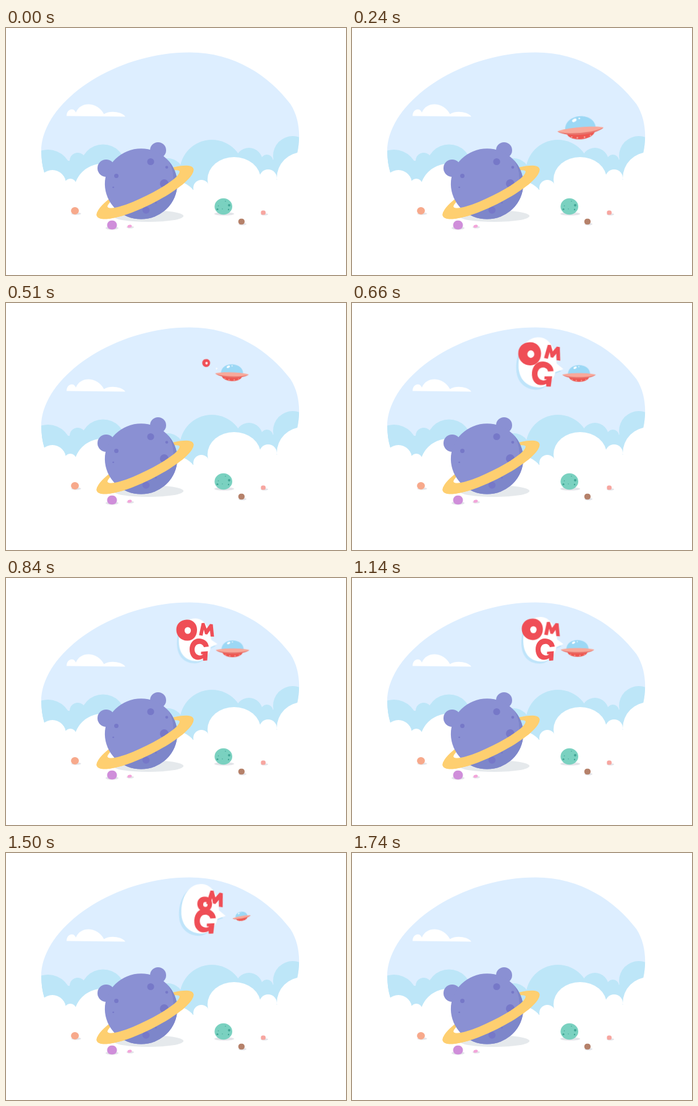
An HTML page that plays this animation: 550 px wide and 400 px high, repeating every 1950 ms.

```html
<!DOCTYPE html>
<html lang="en">
<head>
<meta charset="utf-8">
<title>Planet and saucer</title>
<style>
html, body { margin: 0; width: 100%; height: 100%; overflow: hidden; background: #fff; }
svg { display: block; width: 550px; height: 400px; }
.ufo, .say, .bubble, .o, .m, .g { animation: 1950ms linear infinite; transform-origin: 0 0; }
.ufo { animation-name: ufo; }
.say { animation-name: say; }
.bubble { animation-name: bubble; }
.o { animation-name: o; }
.m { animation-name: m; }
.g { animation-name: g; }

@keyframes ufo {
  0%, 3.08% { transform: translate(528px, 86px) rotate(-20deg) scale(0); }
  4.62% { transform: translate(511px, 96px) rotate(-20deg) scale(.4); }
  7.69% { transform: translate(456px, 138px) rotate(-17deg) scale(.95); }
  10.77% { transform: translate(392px, 163px) rotate(-10deg) scale(1.34); }
  12.31% { transform: translate(370px, 165.5px) rotate(-5deg) scale(1.38); }
  15.38% { transform: translate(352px, 151px) rotate(2deg) scale(1.3); }
  20% { transform: translate(352px, 123px) rotate(6deg) scale(1.1); }
  23.08% { transform: translate(359px, 116px) rotate(4deg) scale(1.03); }
  26.15% { transform: translate(365.5px, 115.5px) rotate(2deg) scale(1); }
  30.77% { transform: translate(367.5px, 116.5px) rotate(0deg) scale(1); }
  43.08% { transform: translate(366.5px, 117.3px) rotate(0deg) scale(1); }
  58.46% { transform: translate(364.7px, 116.7px) rotate(0deg) scale(1); }
  66.15% { transform: translate(368px, 113px) rotate(-4deg) scale(1.02); }
  72.31% { transform: translate(376px, 107.5px) rotate(-8deg) scale(.85); }
  76.92% { transform: translate(381px, 104px) rotate(-10deg) scale(.55); }
  81.54% { transform: translate(389px, 96px) rotate(-12deg) scale(.33); }
  86.15% { transform: translate(397px, 87.5px) rotate(-14deg) scale(.08); }
  89.23%, 100% { transform: translate(397px, 87.5px) rotate(-14deg) scale(0); }
}
/* The group moves with the tip of the bubble's tail. */
@keyframes say {
  0%, 58.46% { transform: translate(342px, 107px); }
  66.15% { transform: translate(344px, 107px); }
  76.92% { transform: translate(355px, 102px); }
  86.15%, 100% { transform: translate(393px, 89px); }
}
@keyframes bubble {
  0%, 25.64% { transform: rotate(20deg) scale(0); }
  26.15% { transform: rotate(20deg) scale(.03); }
  28.5% { transform: rotate(15deg) scale(.55); }
  30.77% { transform: rotate(10deg) scale(1.05); }
  33.85% { transform: rotate(4deg) scale(1.16); }
  38% { transform: rotate(-1deg) scale(1.02); }
  40% { transform: rotate(0deg) scale(.97); }
  43.08% { transform: rotate(0deg) scale(.99); }
  58.46% { transform: rotate(1deg) scale(1.03); }
  66.15% { transform: rotate(1deg) scale(1.12); }
  76.92% { transform: rotate(5deg) scale(1.15); }
  81.54% { transform: rotate(12deg) scale(.7); }
  85.6%, 100% { transform: rotate(20deg) scale(0); }
}
@keyframes o {
  0%, 24.62% { transform: rotate(6deg) scale(0); }
  26.15% { transform: rotate(4deg) scale(.37); }
  30.77% { transform: rotate(3deg) scale(1.08); }
  33.85% { transform: rotate(0deg) scale(1.1); }
  38% { transform: rotate(0deg) scale(.97); }
  43.08% { transform: rotate(0deg) scale(1); }
  58.46% { transform: rotate(1deg) scale(1.02); }
  69% { transform: rotate(1deg) scale(1.1); }
  76.92% { transform: rotate(5deg) scale(.72); }
  81.54%, 100% { transform: rotate(8deg) scale(0); }
}
@keyframes m {
  0%, 26.9% { transform: rotate(10deg) scale(0); }
  32.3% { transform: rotate(6deg) scale(1.12); }
  36.92% { transform: rotate(0deg) scale(1.05); }
  40% { transform: rotate(0deg) scale(.97); }
  43.08% { transform: rotate(0deg) scale(1); }
  58.46% { transform: rotate(0deg) scale(1.05); }
  70% { transform: rotate(2deg) scale(1.1); }
  76.92% { transform: rotate(6deg) scale(1.13); }
  80% { transform: rotate(9deg) scale(.75); }
  83.5%, 100% { transform: rotate(12deg) scale(0); }
}
@keyframes g {
  0%, 27.69% { transform: rotate(10deg) scale(0); }
  33.85% { transform: rotate(4deg) scale(1.12); }
  38% { transform: rotate(0deg) scale(1.04); }
  41% { transform: rotate(0deg) scale(.97); }
  43.08%, 58.46% { transform: rotate(0deg) scale(1); }
  70% { transform: rotate(1deg) scale(1.07); }
  76.92% { transform: rotate(3deg) scale(1.12); }
  81.54% { transform: rotate(6deg) scale(.75); }
  85%, 100% { transform: rotate(10deg) scale(0); }
}
</style>
</head>
<body>
<svg viewBox="0 0 550 400" role="img" aria-label="A saucer above a ringed planet says OMG">
  <defs>
    <path id="sky" d="M57 200C57 120 175 39.5 297 39.5C370 39.5 426 78 460 123C475 146 477 176 471 203V262H303L62 250V234C59 224 57 212 57 200Z"/>
    <path id="balloon" d="M0 0L-10 -7C-12 -28 -23 -42 -36 -42C-54 -42 -64 -24 -63 -2C-62 18 -50 28 -34 28C-22 28 -13 18 -11 5Z"/>
    <path id="ring" fill-rule="evenodd" d="M-87 0A87 21.5 0 0 1 87 0A87 21.5 0 0 1 -87 0ZM-65 -5.5A65 11.5 0 0 0 65 -5.5A65 11.5 0 0 0 -65 -5.5Z"/>
    <ellipse id="body" cx="218.5" cy="252.4" rx="58.6" ry="57.1"/>
    <clipPath id="inSky"><use href="#sky"/></clipPath>
    <clipPath id="inBody"><use href="#body"/></clipPath>
    <clipPath id="front"><rect x="-95" y="-5.5" width="190" height="40"/></clipPath>
  </defs>

  <use href="#sky" fill="#ddeeff"/>
  <g fill="#bde6f8" clip-path="url(#inSky)">
    <circle cx="68" cy="235" r="38"/>
    <circle cx="116" cy="215" r="13"/>
    <circle cx="157" cy="225" r="36.5"/>
    <circle cx="262" cy="236" r="25"/>
    <circle cx="333" cy="233" r="52"/>
    <circle cx="393" cy="216" r="22"/>
    <circle cx="422" cy="215" r="10"/>
    <circle cx="464" cy="207" r="32"/>
    <path d="M50 215H180V270H50ZM270 222H410V213H440V222H480V270H270Z"/>
  </g>
  <g fill="#fff">
    <circle cx="75" cy="252" r="22"/>
    <circle cx="104" cy="254" r="10"/>
    <circle cx="155" cy="265" r="45"/>
    <circle cx="270" cy="290" r="43"/>
    <circle cx="316" cy="259" r="13"/>
    <ellipse cx="369" cy="245" rx="43" ry="36"/>
    <circle cx="424" cy="243" r="14"/>
    <circle cx="480" cy="243" r="42"/>
    <path d="M50 252H290V262H328V246H482V300H50Z"/>
    <path d="M98 142.5C98 131 110 128 113 137C120 118 148 119 158.5 139.5C166 133 188 135 193 143.5Z"/>
  </g>

  <!-- planet -->
  <ellipse cx="230" cy="304.5" rx="57" ry="9.5" fill="#e5e9ec"/>
  <use href="#ring" transform="translate(225 266) rotate(-26.5)" fill="#fecf70"/>
  <g fill="#8a90d3">
    <circle cx="246" cy="198" r="13"/>
    <circle cx="162" cy="227" r="14"/>
    <use href="#body"/>
  </g>
  <g clip-path="url(#inBody)">
    <path d="M250 200C266 214 273 232 270 254C255 280 215 296 165 302V320H290V200Z" fill="#7d86ca"/>
    <g fill="#7678c8">
      <circle cx="234" cy="216.5" r="5.6"/>
      <circle cx="178.5" cy="239.5" r="3.5"/>
      <circle cx="260" cy="225.5" r="2.3"/>
      <circle cx="256" cy="252" r="7"/>
      <circle cx="173.5" cy="258" r="1.3"/>
      <circle cx="226.5" cy="295" r="5.8"/>
      <circle cx="242.5" cy="283" r="1.4"/>
    </g>
  </g>
  <g transform="translate(225 266) rotate(-26.5)" clip-path="url(#front)">
    <use href="#ring" fill="#fecf70"/>
  </g>

  <!-- pebbles -->
  <g fill="#e3e4e9">
    <ellipse cx="113.5" cy="300.7" rx="8" ry="2"/>
    <ellipse cx="171.5" cy="324" rx="10.5" ry="2.8"/>
    <ellipse cx="201" cy="322.6" rx="6" ry="1.9"/>
    <ellipse cx="353" cy="301" rx="16" ry="2.8"/>
    <ellipse cx="382.5" cy="317.6" rx="6.5" ry="1.9"/>
    <ellipse cx="418" cy="301.7" rx="6" ry="1.7"/>
  </g>
  <ellipse cx="111.5" cy="296" rx="6.4" ry="6" fill="#f7a98b"/>
  <rect x="163.5" y="311.8" width="16" height="14.5" rx="7.2" fill="#cf8eda"/>
  <ellipse cx="200" cy="321" rx="3.6" ry="2.4" transform="rotate(-15 200 321)" fill="#f3a5da"/>
  <ellipse cx="351.7" cy="289" rx="14.3" ry="13.2" fill="#7ad1c0"/>
  <g fill="#43a797">
    <circle cx="361" cy="287" r="2"/>
    <circle cx="342" cy="293.5" r="1.6"/>
    <circle cx="360" cy="294" r="1.2"/>
    <circle cx="355" cy="280.5" r=".8"/>
    <circle cx="343.5" cy="288" r=".8"/>
    <circle cx="350" cy="293" r=".7"/>
  </g>
  <rect x="375.8" y="308.8" width="10.2" height="9.4" rx="4.4" fill="#b5816a"/>
  <rect x="412.3" y="295.6" width="7.7" height="7" rx="3.4" fill="#f7a6a0"/>

  <!-- speech -->
  <g class="say">
    <g class="bubble">
      <use href="#balloon" x="-3" y="3.5" fill="#bfe4fa"/>
      <use href="#balloon" fill="#fff"/>
    </g>
    <g fill="#ef4e56">
      <g class="o">
        <path d="M-50 -39.5C-40 -40.5 -32.5 -32.5 -33 -22.5C-33 -12.5 -40 -5 -49 -5.5C-59 -5.5 -66.5 -13.5 -66.5 -23C-66.5 -32.5 -60 -39 -50 -39.5Z"/>
        <ellipse cx="-48" cy="-22" rx="5.1" ry="5.6" fill="#fff"/>
      </g>
      <path class="m" d="M-29.7 -14.5L-25.5 -34L-21 -34.3L-17.5 -25L-12 -32.5L-7.5 -32L-5.5 -12L-11 -12.3L-12 -22L-16.5 -15.5L-20 -16L-22 -23.5L-24 -13.5Z"/>
      <path class="g" d="M-14 4C-15 -4 -22 -9 -30 -9C-39 -9 -45 -1 -45 8.5C-45 19 -39 25.5 -31.5 25.5C-28 25.5 -25.5 24.5 -23.5 23L-23 27L-16.5 26.5L-15.5 11.5L-26.5 12.5V16.5H-23C-26 19.5 -32 19 -35 15C-38.5 10 -37 2.5 -32.5 .5C-28 -1.5 -23 .5 -22 5Z"/>
    </g>
  </g>

  <!-- saucer -->
  <g class="ufo">
    <path d="M-16.5 3C-14 13.5 14 13.5 16.5 3Z" fill="#ee5751"/>
    <g fill="#f9b9ad">
      <circle cx="-11" cy="7.3" r=".8"/>
      <circle cx="-4.5" cy="8.7" r=".9"/>
      <circle cx="4" cy="8.7" r=".9"/>
      <circle cx="11" cy="7.3" r=".8"/>
    </g>
    <path d="M-27 -.5C-17 7.5 17 7.5 27 -.5Z" fill="#e8726a"/>
    <path d="M-18 -2C-17 -21 17 -21 18 -2Z" fill="#9cd8f5"/>
    <ellipse cx="-6.3" cy="-12" rx="2.8" ry="1.7" transform="rotate(-25 -6.3 -12)" fill="#fff"/>
    <circle cx="-.3" cy="-13.7" r=".9" fill="#fff"/>
    <path d="M-27.3 -.8C-16 -4.2 16 -4.2 27.3 -.8C18 4.7 -18 4.7 -27.3 -.8Z" fill="#f8a99b"/>
  </g>
</svg>
</body>
</html>
```
